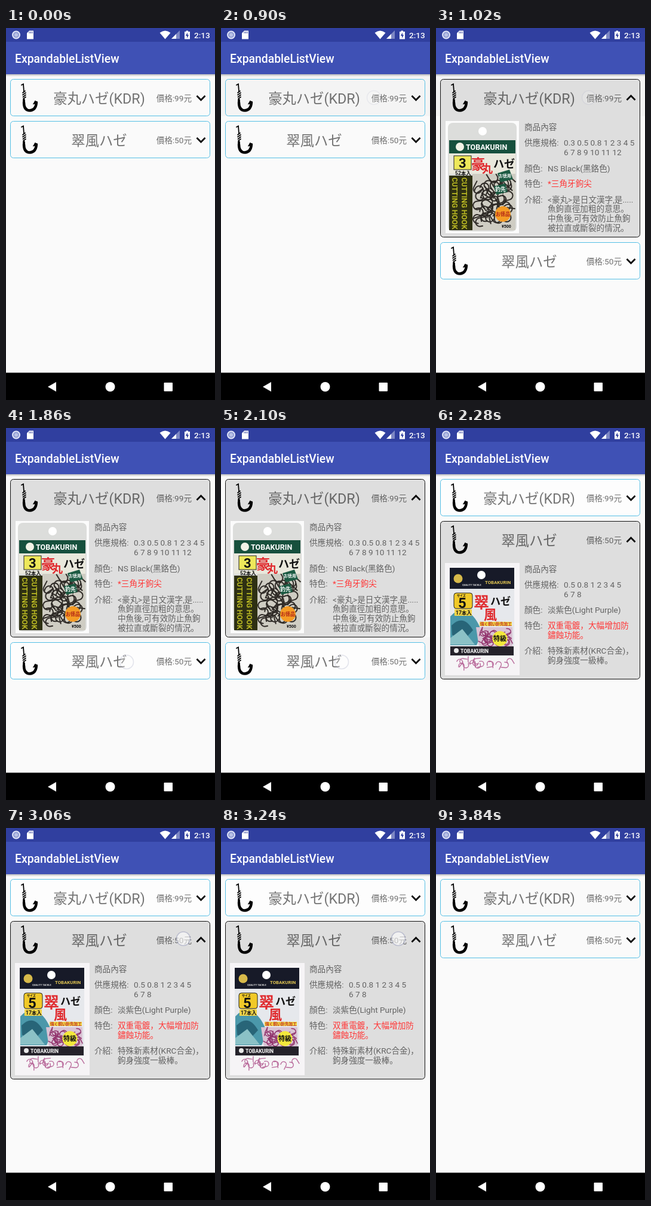
These frames come from a looping animation (350x620 px, 3.96 s). An HTML page:

```html
<!DOCTYPE html>
<html lang="ja">
<head>
<meta charset="utf-8">
<title>ExpandableListView</title>
<style>
html, body { margin: 0; width: 100%; height: 100%; overflow: hidden; background: #fafafa; }
svg { display: block; width: 350px; height: 620px; }
text { font: 13.6px Roboto, 'Noto Sans CJK JP', 'Noto Sans CJK', sans-serif; fill: #636363; white-space: pre; }
.name { font-size: 23.33px; text-anchor: middle; fill: #000; fill-opacity: .54; }
.price { text-anchor: end; fill: #000; fill-opacity: .56; }
.red { fill: #ff3838; }
.bar { font-size: 19.35px; font-weight: 500; fill: #fff; }
.clock { font-weight: 500; fill: #fff; }
.line { fill: none; stroke: #000; }
.pack text { font-weight: 700; fill: #111; }
.pack .big { font-weight: 900; fill: #e0282c; }
</style>
</head>
<body>
<svg viewBox="0 0 350 620">
  <defs>
    <linearGradient id="shade" x2="0" y2="1">
      <stop stop-opacity=".25"/><stop offset="1" stop-opacity="0"/>
    </linearGradient>
    <g id="hook" class="line" stroke-linecap="round">
      <path d="M26 95L29 93.500L30 106" stroke-width="1.8"/>
      <path d="M28 108L32 105M28 111.500L33 108M28.500 115L33 111.500M29 118L33 115" stroke-width="1.7"/>
      <path d="M30 120L30 127" stroke-width="3.800"/>
      <path d="M30 124Q30 137.500 40 137.500Q50 137 51 124" stroke-width="4.400"/>
      <path d="M51 127L49 121L45.500 127L50 125.500" fill="#000" stroke-width="1"/>
    </g>
  </defs>
  <rect width="350" height="620" fill="#fafafa"/>
  <rect id="press" width="350"/>

  <g id="item0">
    <rect class="card" x="7.500" y="85.500" width="334" rx="5"/>
    <use href="#hook"/>
    <text class="name" x="156" y="125.500">豪丸ハゼ(KDR)</text>
    <text class="price" x="311" y="121.500">價格:99元</text>
    <path class="arrow line" stroke-width="2.700"/>
    <g class="detail">
      <g class="pack">
        <rect x="16" y="155" width="123" height="187" fill="#fbfbfb"/>
        <rect x="20" y="158" width="115" height="181" rx="8" fill="#dcdddb"/>
        <circle cx="78" cy="172" r="7" fill="#fff"/>
        <path d="M22 187H133V209H22Z" fill="#17503d"/>
        <circle cx="40" cy="198" r="7" fill="#f2f2e6"/>
        <text x="50" y="203" style="font-size:12.5px;fill:#fff">TOBAKURIN</text>
        <path d="M22 209H133V243H22Z" fill="#e9e8dc"/>
        <path d="M22 246H61V337H22Z" fill="#2e3013"/>
        <path d="M61 243H133V337H61Z" fill="#cfcdc3"/>
        <g id="darkHooks" class="line"/>
        <rect x="30" y="213" width="29" height="23" fill="#eee85a" stroke="#222"/>
        <text x="38" y="233" style="font-size:22px">3</text>
        <text x="32" y="245" style="font-size:8.5px">52本入</text>
        <text class="big" x="59" y="235" style="font-size:23px">豪</text>
        <text class="big" x="77" y="241" style="font-size:18px">丸</text>
        <text x="96" y="233" style="font-size:18px">ハゼ</text>
        <text transform="translate(27 249) rotate(90)" style="font-size:12px;fill:#b9b823">CUTTING HOOK</text>
        <text transform="translate(43 249) rotate(90)" style="font-size:12px;fill:#b9b823">CUTTING HOOK</text>
        <path d="M103 242L123 236L129 252L108 257Z" fill="#1c5b43"/>
        <text x="105" y="249" style="font-size:7px;fill:#fff">お徳用</text>
        <path d="M97 264L116 259L120 273L101 278Z" fill="#1c5b43"/>
        <text x="99" y="272" style="font-size:9px;fill:#fff">釣先</text>
        <circle cx="112" cy="310" r="13" fill="#f49b25"/>
        <text x="100" y="313" style="font-size:8px;fill:#b12216">お徳品</text>
        <text x="110" y="333" style="font-size:7px">¥500</text>
      </g>
    </g>
  </g>

  <g id="item1">
    <rect class="card" x="7.500" y="155.500" width="334" rx="5"/>
    <use href="#hook" y="70"/>
    <text class="name" x="156" y="195.500">翠風ハゼ</text>
    <text class="price" x="311" y="191.500">價格:50元</text>
    <path class="arrow line" transform="translate(0 70)" stroke-width="2.700"/>
    <g class="detail">
      <g class="pack">
        <rect x="15" y="225" width="125" height="187" fill="#f6f4f6"/>
        <path d="M23 233H131V380H23Z" fill="#e6e8ec"/>
        <path d="M23 233H131V268H23Z" fill="#171a28"/>
        <circle cx="76" cy="245" r="7" fill="#fff"/>
        <circle cx="37" cy="251" r="7.500" fill="#d7b94a"/>
        <text x="82" y="260" style="font-size:7.8px;fill:#e2c653">TOBAKURIN</text>
        <text x="44" y="263" style="font-size:4px;fill:#ddd">QUALITY TACKLE</text>
        <path d="M24 314Q43 294 57 309Q69 318 77 341L68 362H24Z" fill="#4b98aa"/>
        <path d="M26 329Q46 309 62 337L47 353L27 345Z" fill="#286578"/>
        <path d="M24 350L44 335L65 361H24Z" fill="#8bc1c6"/>
        <path d="M67 332H128V365H72Z" fill="#d9c3d4"/>
        <g id="pinkHooks" class="line"/>
        <rect x="30" y="275" width="31" height="26" rx="4" fill="#f1c928" stroke="#222"/>
        <text x="37" y="300" style="font-size:24px">5</text>
        <text x="35" y="281" style="font-size:5px">サイズ</text>
        <rect x="31" y="302" width="29" height="11" fill="#f1d448"/>
        <text x="33" y="311" style="font-size:8.5px">17本入</text>
        <text class="big" x="63" y="300" style="font-size:26px">翠</text>
        <text class="big" x="80" y="319" style="font-size:22px">風</text>
        <text x="91" y="295" style="font-size:17px">ハゼ</text>
        <path d="M73 323H127V330H73Z" fill="#efd343"/>
        <text x="74" y="329" style="font-size:6.6px;fill:#c33529">強く鋭い針先加工</text>
        <path d="M24 364H130V379H24Z" fill="#25222a"/>
        <circle cx="34" cy="371" r="4" fill="#e8e8e8"/>
        <text x="41" y="375" style="font-size:8.5px;fill:#fff">TOBAKURIN</text>
        <circle cx="107" cy="351" r="12.500" fill="#f3e83c"/>
        <text x="96" y="355" style="font-size:11px">特級</text>
      </g>
    </g>
  </g>
  <circle id="touch" r="11.500" fill="#fff" stroke="#a4a8c4" stroke-width="1.500"/>

  <rect y="77" width="350" height="4" fill="url(#shade)"/>
  <rect width="350" height="77" fill="#3f51b5"/>
  <rect width="350" height="23" fill="#303f9f"/>
  <text class="bar" x="15" y="57.500">ExpandableListView</text>
  <circle cx="17" cy="11.500" r="6" fill="#8f9bd3" stroke="#dfe3f7" stroke-width="2"/>
  <circle cx="17" cy="11.500" r="3" fill="#b9c1e6"/>
  <path d="M39 4.500H46V18.500H35V8.500Z" fill="#fff"/>
  <path d="M39 6V9M41.500 6V9M44 6V9" stroke="#303f9f"/>
  <path d="M257.500 8Q266.500 1 275.500 8L266.500 18.500Z" fill="#fff"/>
  <path d="M291 4V18H277Z" fill="#7e88c4"/>
  <path d="M285 10V18H277Z" fill="#fff"/>
  <path d="M299 6H301.500V4.500H305V6H308V18.500H299Z" fill="#fff"/>
  <path d="M304 7.500L300.800 13H303V17L306.200 11.500H304Z" fill="#303f9f"/>
  <text class="clock" x="315" y="16.500">2:13</text>
  <rect y="574.500" width="350" height="46"/>
  <g fill="#fff">
    <path d="M70 598L84 590V606Z"/>
    <circle cx="174.500" cy="598" r="8"/>
    <rect x="264.500" y="591" width="14.500" height="14.500" rx="1"/>
  </g>
</svg>
<script>
const $ = id => document.getElementById(id);
const items = [$('item0'), $('item1')];
const set = (el, attrs) => { for (const k in attrs) el.setAttribute(k, attrs[k]); };
const add = (parent, tag, attrs, text = '') => {
  const el = document.createElementNS('http://www.w3.org/2000/svg', tag);
  set(el, attrs);
  el.textContent = text;
  parent.append(el);
};

// Each row: x, baseline, text, optional class
const rows = [[
  [148, 169.5, '商品內容'],
  [148, 195.5, '供應規格:'], [214, 195.5, '0.3 0.5 0.8 1 2 3 4 5'], [214, 212, '6 7 8 9 10 11 12'],
  [148, 238.5, '顏色:'], [187, 238.5, 'NS Black(黑鉻色)'],
  [148, 264, '特色:'], [187, 264, '*三角牙鉤尖', 'red'],
  [148, 290.5, '介紹:'], [187, 290.5, '<豪丸>是日文漢字,是.....'], [187, 306, '魚鉤直徑加粗的意思。'],
  [187, 322, '中魚後,可有效防止魚鉤'], [187, 338, '被拉直或斷裂的情況。']
], [
  [148, 239.5, '商品內容'],
  [148, 265.5, '供應規格:'], [214, 265.5, '0.5 0.8 1 2 3 4 5'], [214, 281.5, '6 7 8'],
  [148, 308, '顏色:'], [187, 308, '淡紫色(Light Purple)'],
  [148, 334, '特色:'], [187, 334, '双重電鍍，大幅增加防', 'red'], [187, 350, '鏽蝕功能。', 'red'],
  [148, 376, '介紹:'], [187, 376, '特殊新素材(KRC合金)，'], [187, 392, '鉤身強度一級棒。']
]];
rows.forEach((list, i) => {
  const detail = items[i].querySelector('.detail');
  for (const [x, y, text, cls = ''] of list) add(detail, 'text', { x, y, class: cls }, text);
});

let seed = 7;
const rand = () => (seed = seed * 16807 % 2147483647) / 2147483647;
function scatter(parent, count, x, y, w, h, r, stroke, width) {
  for (let i = 0; i < count; i++) {
    const pos = `${x + rand() * w} ${y + rand() * h}`;
    add(parent, 'path', {
      d: `M${-r} ${-r * 1.7}V0A${r} ${r} 0 0 0 ${r} 0V${-r * .6}`,
      transform: `translate(${pos}) rotate(${rand() * 360})`, stroke, 'stroke-width': width
    });
  }
}
scatter($('darkHooks'), 46, 69, 250, 56, 74, 7, '#2f2b27', 2);
scatter($('pinkHooks'), 30, 77, 339, 45, 20, 5, '#93366f', 1.5);
scatter($('pinkHooks'), 15, 28, 388, 96, 9, 4.5, '#b96a9b', 1.4);

// x, y, start, end, opacity
const touches = [[256, 116, 540, 1080, .15], [202, 390, 1860, 2220, .3], [297, 184.5, 3060, 3360, .6]];
// y, height, start, end, colour
const presses = [[77, 70, 900, 1200, '#f4f4f4'], [349, 71, 2100, 2220, '#f4f4f4'], [217, 203, 2220, 2280, '#f7f3f4']];

function draw(now) {
  const t = now % 3960;
  const during = ([, , start, end]) => t >= start && t < end;
  const open = t < 1020 || t >= 3360 ? -1 : t < 2220 ? 0 : 1;
  items.forEach((item, i) => {
    const on = i === open;
    set(item.querySelector('.card'), {
      height: on ? 263 : 61,
      fill: on ? '#dedede' : open < 0 ? 'none' : '#fdfdfd',
      stroke: on ? '#111' : '#55bfe5'
    });
    set(item.querySelector('.arrow'), { d: on ? 'M319.5 120L326.500 113L333.500 120' : 'M319.5 113L326.500 120L333.500 113' });
    set(item.querySelector('.detail'), { visibility: on ? 'visible' : 'hidden' });
  });
  set(items[1], { transform: `translate(0 ${open === 0 ? 202 : 0})` });

  const [cx, cy, , , opacity] = touches.find(during) || [0, 0, 0, 0, 0];
  set($('touch'), { cx, cy, opacity });
  const [y, height, , , fill] = presses.find(during) || [0, 0, 0, 0, 'none'];
  set($('press'), { y, height, fill });
}

let begin;
function loop(now) {
  begin ??= now;
  draw(now - begin);
  requestAnimationFrame(loop);
}
draw(0);
requestAnimationFrame(loop);
</script>
</body>
</html>
```
